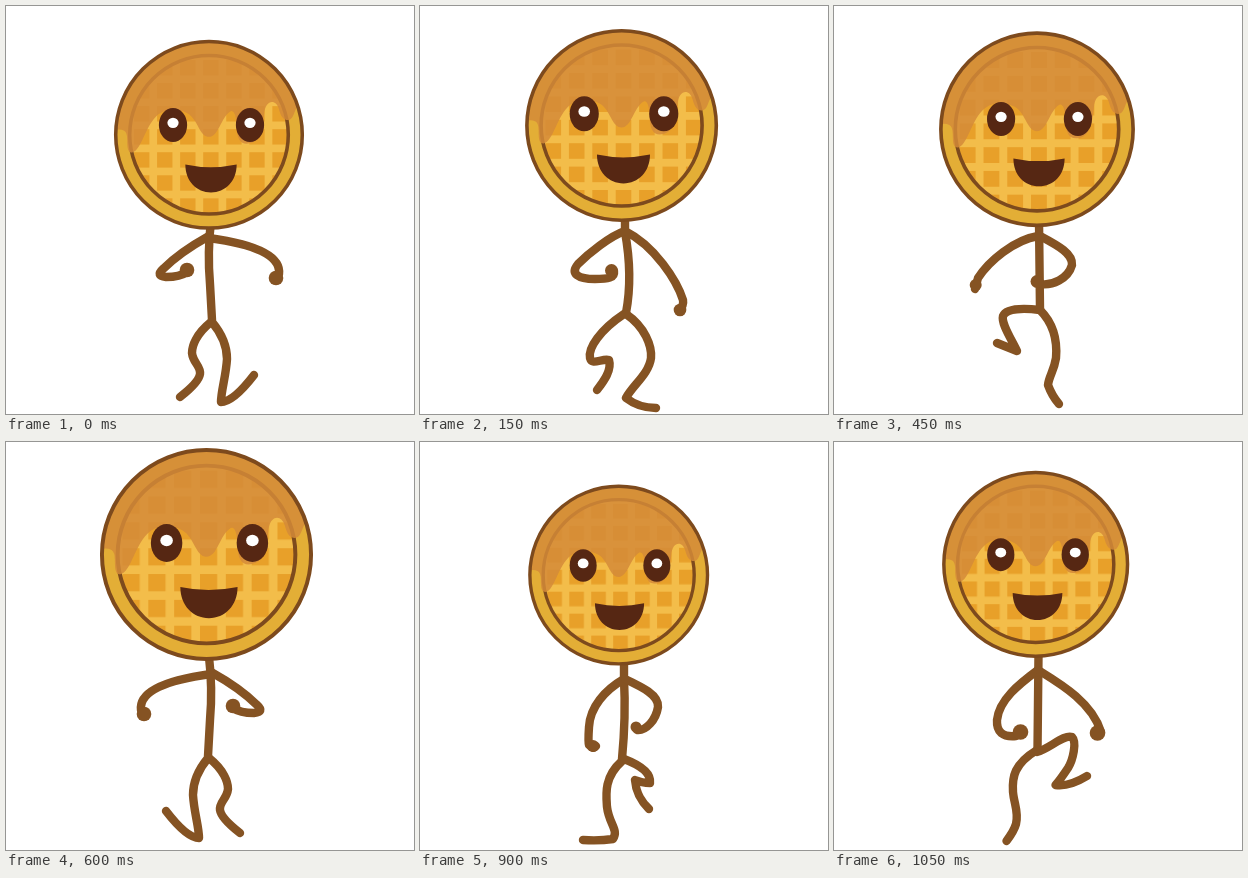
Animation, 408 px wide and 408 px high, one loop 1200 ms. Source, as an HTML page without scripts:

```html
<!DOCTYPE html>
<html lang="en">
<head>
<meta charset="utf-8">
<title>Running waffle</title>
<style>
  html, body { margin: 0; width: 100%; height: 100%; overflow: hidden; background: #fff; }
  svg { display: block; width: 100%; height: 100%; }
  .pose { visibility: hidden; animation: show 1200ms step-end infinite; animation-delay: calc(var(--i) * 150ms - 1200ms); }
  .limbs { fill: none; stroke: #855323; stroke-width: 8.4; stroke-linecap: round; stroke-linejoin: round; }
  .limbs circle { fill: #855323; stroke: none; }
  .rim { stroke: #7d4a1d; stroke-width: 3.6; }
  @keyframes show {
    0% { visibility: visible; }
    12.5%, 100% { visibility: hidden; }
  }
</style>
</head>
<body>
<svg viewBox="0 0 408 408">
  <defs>
    <pattern id="grid" x="-5.9" y="17.7" width="23.4" height="23.4" patternUnits="userSpaceOnUse">
      <rect width="23.4" height="23.4" fill="#f3bd4a"/>
      <rect width="15.6" height="15.6" fill="#e8a029"/>
    </pattern>

    <!-- waffle centred on 0,0 -->
    <g id="head">
      <circle r="94.7" fill="#e3ae36"/>
      <circle class="rim" r="80.5" fill="url(#grid)"/>
      <path fill="#d48b39" fill-opacity=".84" d="M-94.500-5 Q-90-6-86-4 Q-83-2-83 5 C-83 15-82 18-78 18
        C-68 16-65-10-51-21 Q-38-30-22-22 C-11-16-10 2 0 2 C10 2 12-18 22-24
        Q27-26 28-10 C28 4 32 9 38 9 C50 9 54-2 56-21 C57-36 68-37 71-26
        C73-18 76-15 80-15 C86-15 86-24 90-29 A94.700 94.700 0 0 0-94.500-5Z"/>
      <circle class="rim" r="94.7" fill="none"/>
    </g>

    <g id="eye">
      <ellipse rx="14.3" ry="17.2" fill="#562713"/>
      <ellipse cy="-2.2" rx="5.7" ry="5.2" fill="#fff"/>
    </g>

    <!-- face centred between the eyes -->
    <g id="face">
      <use href="#eye" x="-39"/>
      <use href="#eye" x="39"/>
      <path fill="#562713" d="M-26.500 40 Q-1 45.500 25.500 40 C25.500 57 14 68.300-.5 68.300 S-26.500 57-26.500 40Z"/>
    </g>

    <g id="stride" class="limbs">
      <path d="M205 215 C202 240 202 255 204 278 L206 314"/>
      <path d="M203 230 C185 240 167 253 157 263 Q149 270 160 271 Q174 271 181 266"/>
      <path d="M203 232 Q276 242 273 268"/>
      <path d="M205 316 C190 328 186 340 186 347 C187 357 195 360 194 368 C193 375 183 384 174 391"/>
      <path d="M206 316 C216 328 221 340 221 353 C220 370 215 385 215 396 C225 396 238 382 248 369"/>
      <circle cx="181" cy="264" r="7.300"/>
      <circle cx="270" cy="272" r="7.300"/>
    </g>

    <g id="land" class="limbs">
      <path d="M204 220 V237 Q206 275 202 317"/>
      <path d="M204 237 C185 248 170 265 169 285 Q168 300 169 303 Q173 308 176 304"/>
      <path d="M205 237 C222 245 239 253 238 265 C236 278 226 289 217 288"/>
      <path d="M202 319 C184 335 186 352 187 365 C189 382 199 388 193 397 Q180 399 163 398"/>
      <path d="M204 317 C225 325 231 333 230 341 Q222 341 215 338 C216 352 222 360 229 367"/>
      <circle cx="173" cy="304" r="6"/>
      <circle cx="216" cy="285" r="5.500"/>
    </g>
  </defs>

  <g class="pose" style="--i:0">
    <use href="#stride"/>
    <use href="#head" transform="translate(203 128.800) scale(.985)"/>
    <use href="#face" transform="translate(205.500 119) scale(.987)"/>
  </g>

  <g class="pose" style="--i:1">
    <g class="limbs">
      <path d="M205 212 V226 Q213 270 206 307"/>
      <path d="M205 225 C190 230 168 248 158 258 C150 268 158 273 175 273 C188 273 195 272 194 265"/>
      <path d="M205 225 C235 240 257 275 263 294 Q264 300 259 304"/>
      <path d="M204 308 C180 324 168 342 170 352 C172 360 182 352 189 354 C192 364 184 375 177 384"/>
      <path d="M206 308 C225 321 232 340 231 352 C229 368 212 380 206 392 C215 399 226 402 236 402"/>
      <circle cx="191.500" cy="264.500" r="6.500"/>
      <circle cx="260" cy="304" r="6.300"/>
    </g>
    <use href="#head" transform="translate(201.600 119.500)"/>
    <use href="#face" transform="translate(204 107.800) scale(1.020)"/>
  </g>

  <g class="pose" style="--i:2">
    <use href="#land" transform="matrix(-1 0 0 1 408 0)"/>
    <use href="#head" transform="translate(202.500 129) scale(.98)"/>
    <use href="#face" transform="translate(205 119) scale(.98)"/>
  </g>

  <g class="pose" style="--i:3">
    <g class="limbs">
      <path d="M205 215 L206 303"/>
      <path d="M204 230 C180 234 155 255 144 272 L141 283"/>
      <path d="M206 230 C225 240 239 248 238 259 C234 273 218 280 206 278"/>
      <path d="M206 304 C190 302 172 302 169 310 C167 318 178 334 183 345 L163 337"/>
      <path d="M206 304 C222 320 223 340 222 352 C220 365 215 370 214 379 Q218 390 225 398"/>
      <circle cx="141.700" cy="279" r="6"/>
      <circle cx="203" cy="275.500" r="6.500"/>
    </g>
    <use href="#head" transform="translate(203 123.200) scale(1.015)"/>
    <use href="#face" transform="translate(205.500 113) scale(.985)"/>
  </g>

  <g class="pose" style="--i:4">
    <use href="#stride" transform="matrix(-1 0 0 1 408 0)"/>
    <use href="#head" transform="translate(200.500 112.500) scale(1.104)"/>
    <use href="#face" transform="translate(203.500 101) scale(1.1)"/>
  </g>

  <g class="pose" style="--i:5">
    <g class="limbs">
      <path d="M208 210 C206 250 206 280 200 317"/>
      <path d="M211 232 C190 236 165 252 153 270 Q147 278 144 286"/>
      <path d="M208 233 C222 245 248 250 249 258 C246 267 222 269 206 269"/>
      <path d="M201 317 C185 327 170 343 170 357 C171 374 186 380 189 390 Q186 397 163 399"/>
      <path d="M201 317 C215 327 227 335 227 343 C224 356 210 350 208 360 Q208 370 218 384"/>
      <circle cx="142" cy="288.500" r="7.800"/>
      <circle cx="202" cy="263.500" r="7.800"/>
    </g>
    <use href="#head" transform="translate(201 112.900) scale(1.026)"/>
    <use href="#face" transform="translate(204 102) scale(1.030)"/>
  </g>

  <g class="pose" style="--i:6">
    <use href="#land"/>
    <use href="#head" transform="translate(198.700 133.100) scale(.938)"/>
    <use href="#face" transform="translate(200 123.500) scale(.945)"/>
  </g>

  <g class="pose" style="--i:7">
    <g class="limbs">
      <path d="M204.500 213 L203.500 308"/>
      <path d="M204 228 C185 242 165 258 163 278 Q162 296 182 294"/>
      <path d="M204 228 C225 241 258 260 267 290"/>
      <path d="M203 308 C180 322 178 335 179 350 C180 362 185 370 182 382 Q180 389 172.500 399"/>
      <path d="M203 310 C215 307 230 292 238 295 C243 300 239 318 234 326 Q226 338 221.500 343 Q235 345 253 334"/>
      <circle cx="186.500" cy="290" r="7.800"/>
      <circle cx="263.500" cy="291" r="7.800"/>
    </g>
    <use href="#head" transform="translate(201.700 122.300) scale(.97)"/>
    <use href="#face" transform="translate(204 112.700) scale(.955)"/>
  </g>
</svg>
</body>
</html>
```
